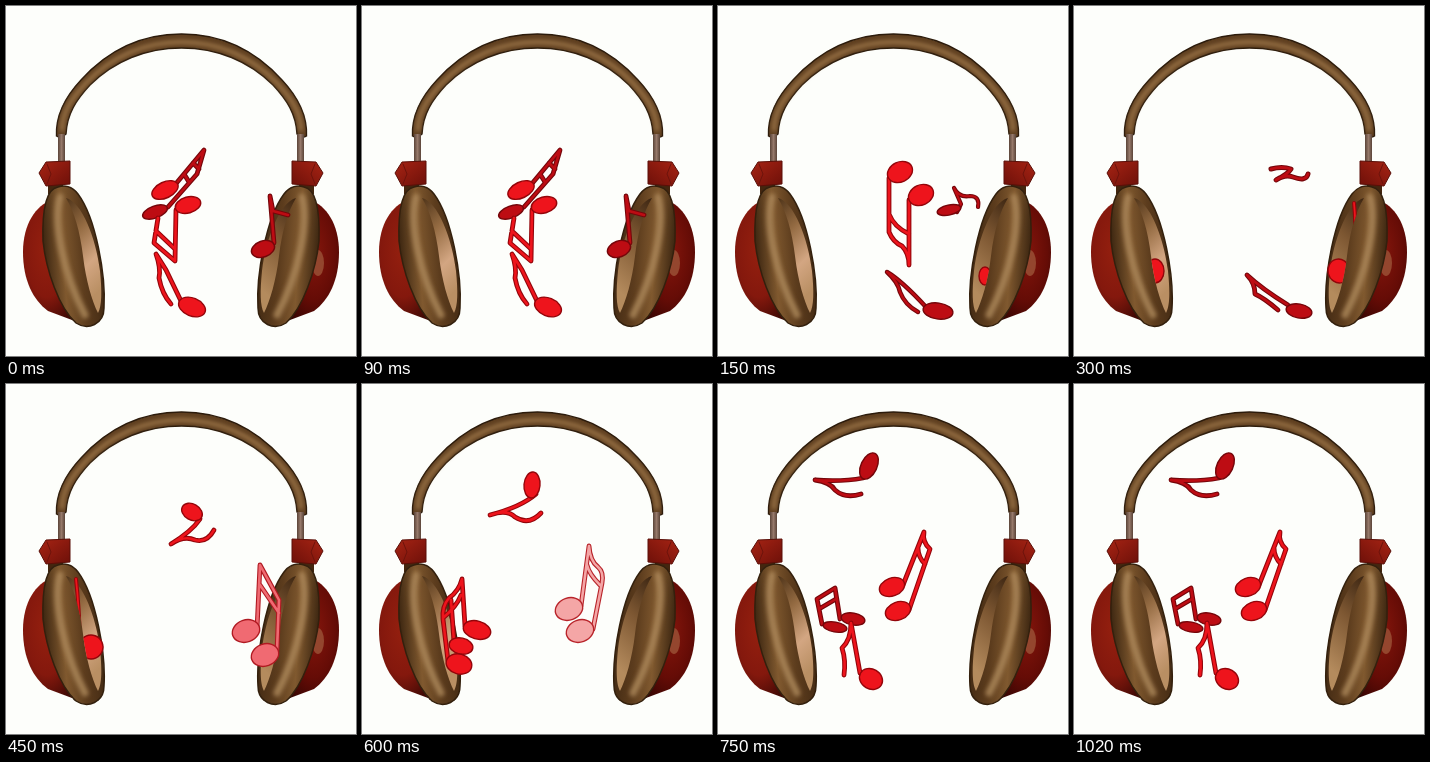
Write an HTML page that moves like this. It is 350 px wide and 350 px high and loops after 1200 ms.

```html
<!DOCTYPE html>
<html lang="en">
<head>
<meta charset="utf-8">
<title>Headphones and notes</title>
<style>
  html, body { margin: 0; width: 100%; height: 100%; overflow: hidden; background: #fdfefb; }
  svg { display: block; width: 100vw; height: 100vh; }
  .pose { visibility: hidden; animation: show 1.2s step-end infinite; animation-delay: calc(var(--i) * 150ms - 1200ms); }
  .pose.last { animation-name: hold; }
  @keyframes show { 0% { visibility: visible } 12.5%, 100% { visibility: hidden } }
  @keyframes hold { 0% { visibility: visible } 37.5%, 100% { visibility: hidden } }
  .line { fill: none; stroke-linecap: round; stroke-linejoin: round; }
</style>
</head>
<body>
<svg viewBox="0 0 350 350">
  <defs>
    <radialGradient id="redShell" cx=".42" cy=".4" r=".65">
      <stop offset="0" stop-color="#95200f"/><stop offset=".6" stop-color="#84180d"/><stop offset="1" stop-color="#420a05"/>
    </radialGradient>
    <radialGradient id="deepShell" cx=".45" cy=".42" r=".65">
      <stop offset="0" stop-color="#85160c"/><stop offset=".6" stop-color="#650c06"/><stop offset="1" stop-color="#360603"/>
    </radialGradient>
    <linearGradient id="ring" x1="0" y1=".3" x2="1" y2=".15">
      <stop offset="0" stop-color="#3f2812"/><stop offset=".3" stop-color="#80592f"/>
      <stop offset=".6" stop-color="#5c3c1d"/><stop offset="1" stop-color="#3d2611"/>
    </linearGradient>
    <linearGradient id="litDish" x1="0" y1="0" x2=".3" y2="1">
      <stop offset="0" stop-color="#4f3419"/><stop offset=".35" stop-color="#946b42"/>
      <stop offset=".7" stop-color="#d3a682"/><stop offset="1" stop-color="#b98f63"/>
    </linearGradient>
    <linearGradient id="dimDish" x1="0" y1="0" x2=".3" y2="1">
      <stop offset="0" stop-color="#3d2612"/><stop offset=".45" stop-color="#7d5732"/><stop offset="1" stop-color="#b48b5d"/>
    </linearGradient>
    <linearGradient id="block" x1="0" y1="0" x2="1" y2="1">
      <stop offset="0" stop-color="#a82414"/><stop offset="1" stop-color="#6d1009"/>
    </linearGradient>
    <linearGradient id="rod">
      <stop offset="0" stop-color="#5a4438"/><stop offset=".5" stop-color="#96796a"/><stop offset="1" stop-color="#5a4438"/>
    </linearGradient>
    <filter id="soft" x="-50%" y="-50%" width="200%" height="200%"><feGaussianBlur stdDeviation="2"/></filter>
    <path id="shell" d="M46 194C30 199 17 218 17 246C17 274 27 294 42 305L74 317Z"/>
    <path id="dish" d="M60 192C76 196 90 232 94 265C96 285 96 300 92 307C86 295 80 275 77 250C74 225 68 205 60 192Z"/>
    <path id="mouth" d="M58 190C68 205 74 225 77 250C80 275 86 295 92 307H110V190Z"/>
    <clipPath id="inL"><use href="#mouth"/></clipPath>
    <clipPath id="inR"><use href="#mouth" transform="translate(350) scale(-1 1)"/></clipPath>
    <g id="cup">
      <path d="M52 128h7v31h-7z" fill="url(#rod)"/>
      <path d="M42 178h15v10h-15z" fill="#44260f"/>
      <path d="M40 156L64 155V178L40 180L33 167Z" fill="url(#block)" stroke="#5a0f08"/>
      <path d="M41 158L45 168L41 178" class="line" stroke="#6d130b"/>
      <path d="M52 181C40 183 36 204 37 235C40 264 53 302 70 317C82 325 98 318 98 302C100 270 90 212 72 188C66 180 58 179 52 181Z" fill="url(#ring)" stroke="#33200d" stroke-width="1.5"/>
      <path d="M54 191C47 216 57 268 79 309" class="line" stroke="#ab875a" stroke-width="7" filter="url(#soft)" opacity=".85"/>
    </g>
  </defs>

  <path d="M50.5 130C49.5 108 60 90 75 74C103 43 138 28 175.5 28S248 43 276 74C291 90 301.5 108 300.5 130Q296 133 291 128C290 108 281 94 267 79C243 55 211 42 175.5 42S108 55 84 79C70 94 61 108 60 128Q55 133 50.5 130Z" fill="#5f3f20" stroke="#2c1b0b" stroke-width="1.4"/>
  <path d="M56 124C56 106 66 92 80 77C106 50 140 36 175.5 36S245 50 271 77C285 92 295 106 295 124" class="line" stroke="#a27a4b" stroke-width="3.5" filter="url(#soft)"/>

  <use href="#shell" fill="url(#redShell)"/>
  <use href="#cup"/>
  <use href="#dish" fill="url(#litDish)"/>
  <g transform="translate(350) scale(-1 1)">
    <use href="#shell" fill="url(#deepShell)"/>
    <ellipse cx="38" cy="257" rx="6" ry="13" fill="#94462e"/>
    <use href="#cup"/>
    <use href="#dish" fill="url(#dimDish)"/>
  </g>
  <g id="notes"></g>
</svg>
<script>
  // Each ink is [fill, edge].
  const RED = ['#ee141c', '#93050a'], DARK = ['#bd0c13', '#74060a'],
        ROSE = ['#f06a72', '#b01a22'], PALE = ['#f4a6a6', '#b8242a'];

  const head = ([fill, edge]) => ([x, y, rx, ry, turn = 0]) =>
    `<ellipse cx="${x}" cy="${y}" rx="${rx}" ry="${ry}" transform="rotate(${turn} ${x} ${y})" fill="${fill}" stroke="${edge}" stroke-width="1.4"/>`;

  const line = (d, color, width) => `<path class="line" d="${d}" stroke="${color}" stroke-width="${width}"/>`;

  // A note is its stems and flags, then its heads, optionally seen inside a cup.
  function note(ink, d, heads, width = 4.8, clip) {
    const body = line(d, ink[1], width) + line(d, ink[0], width - 2.2) + heads.map(head(ink)).join('');
    return clip ? `<g clip-path="url(#${clip})">${body}</g>` : body;
  }

  const stage = document.getElementById('notes');
  function pose(i, ...notes) {
    stage.innerHTML += `<g class="pose${i === 5 ? ' last' : ''}" style="--i:${i}">${notes.join('')}</g>`;
  }

  pose(0,
    note(DARK, 'M168 180L198 144L191 168L162 201M178 168L183 176M187 157L193 163', [[149, 206, 13, 6, -20]]),
    note(RED, 'M170 204L169 255L148 237L152 212M169 243L150 225', [[182, 199, 13, 8, -15]]),
    note(RED, '', [[159, 184, 14, 8, -25]]),
    note(RED, 'M175 295L160 264L150 248Q155 262 153 272Q156 288 165 298', [[186, 301, 14, 9, 22]]),
    note(DARK, 'M268 237L264 190L267 205L282 209', [[257, 243, 12, 8, -20]]));

  pose(1,
    note(RED, 'M171 172V226Q175 236 184 240Q191 247 191 259V194M171 208Q176 221 191 228', [[182, 166, 13, 10, -25], [203, 189, 13, 10, -25]]),
    note(DARK, 'M239 206L243 198L236 182Q241 192 252 190Q262 190 260 201', [[231, 204, 12, 5, -12]], 4.2),
    note(DARK, 'M208 301Q184 275 169 266Q180 276 182 286Q187 299 200 306', [[220, 305, 15, 8, 8]], 4.5),
    note(RED, '', [[267, 270, 6, 9]], 4, 'inR'));

  pose(2,
    note(DARK, 'M197 163Q208 160 217 163Q214 168 202 174Q211 168 219 171Q232 176 234 168', [], 5),
    note(DARK, 'M214 299Q188 283 173 269Q181 277 181 288Q190 292 204 304', [[225, 305, 13, 7, 10]]),
    note(RED, '', [[81, 265, 9, 12]], 4, 'inL'),
    note(RED, 'M280 197Q282 216 281 242', [], 4, 'inR'),
    note(RED, '', [[265, 265, 11, 12, -15]], 4, 'inR'));

  pose(3,
    note(RED, 'M194 135Q186 147 165 160Q178 151 189 156Q201 159 208 146', [[186, 128, 11, 8, 30]]),
    note(RED, 'M70 195Q73 222 74 258', [], 4, 'inL'),
    note(RED, '', [[85, 263, 12, 12, 20]], 4, 'inL'),
    note(ROSE, 'M251 245L254 181L273 216L271 266M254 201L273 229', [[240, 247, 14, 11, -20], [259, 271, 14, 11, -20]]));

  pose(4,
    note(RED, 'M174 110Q159 123 128 131Q145 125 153 133Q167 142 179 129', [[170, 101, 8, 13, 5]]),
    note(PALE, 'M219 222L227 162Q228 177 236 183Q242 188 240 199L231 245M225 181Q227 190 238 201', [[207, 225, 14, 11, -20], [218, 247, 14, 11, -20]]),
    note(RED, 'M103 242L100 195Q97 207 87 214Q80 222 81 235L86 277M99 211Q95 222 81 234M89 216L92 258', [[115, 246, 14, 9, 15], [99, 262, 12, 8, 12], [97, 280, 13, 10, 15]]));

  pose(5,
    note(DARK, 'M145 94Q124 98 97 96Q112 98 117 106Q127 115 143 110', [[151, 82, 8, 14, 25]]),
    note(RED, 'M185 201L206 148Q204 158 212 165L191 226M200 164Q200 173 207 180', [[174, 203, 13, 9, -20], [180, 227, 13, 9, -20]]),
    note(DARK, 'M104 240L99 215L117 204L122 235M101 225L118 215', [[117, 243, 12, 5, 10], [135, 235, 12, 6, 10]]),
    note(RED, 'M142 289L133 239Q133 256 124 264Q128 276 126 291', [[153, 295, 12, 10, 30]]));
</script>
</body>
</html>
```
